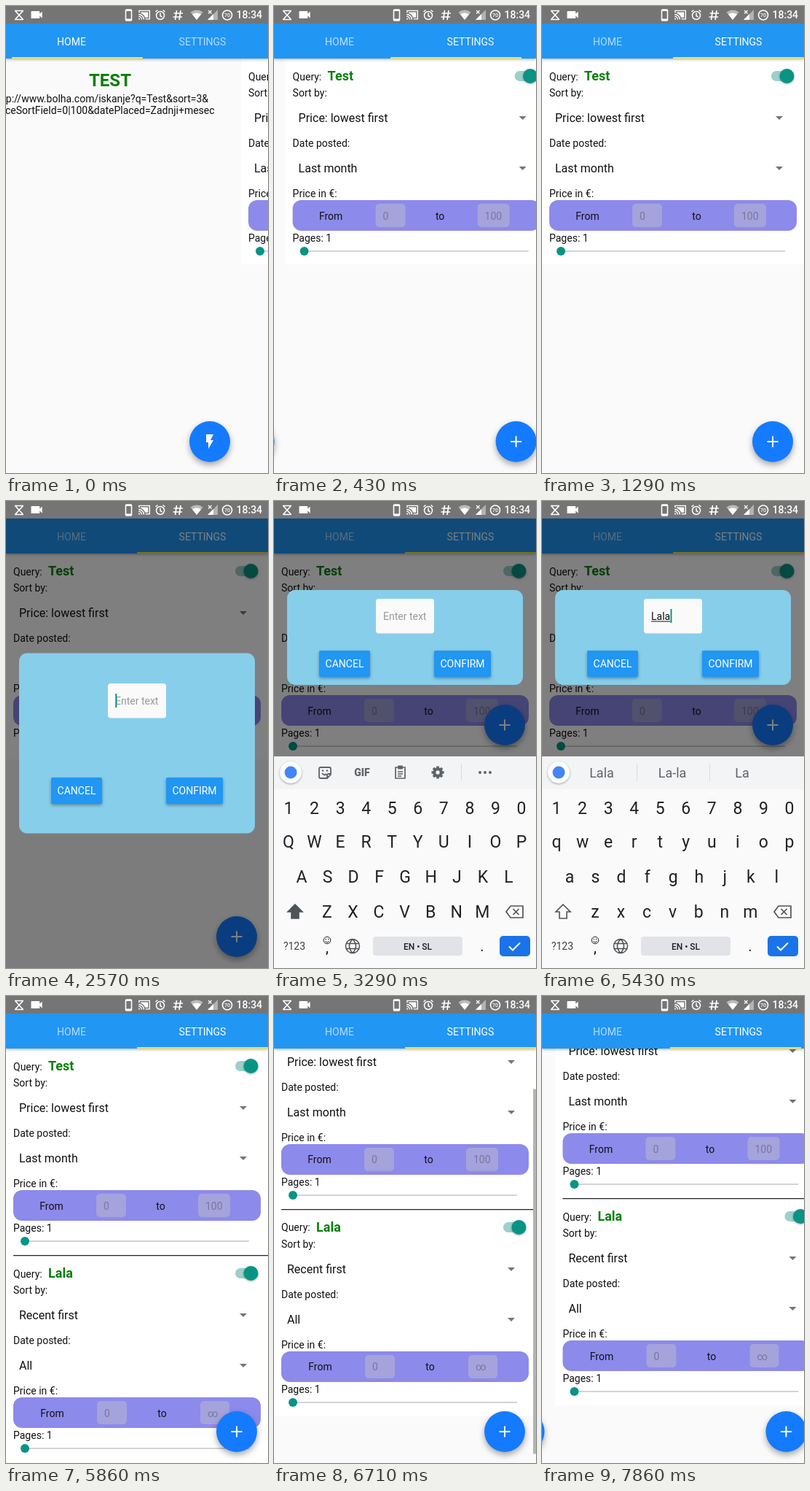
An HTML page with a canvas that plays this animation: 360x640 px, repeating every 8000 ms.

```html
<!DOCTYPE html>
<html lang="en">
<head>
<meta charset="utf-8">
<title>Saved searches</title>
<style>
html, body { margin: 0; width: 100%; height: 100%; overflow: hidden; background: #fafafa; }
canvas { display: block; width: 100vw; height: 100vh; }
</style>
</head>
<body>
<canvas id="stage" width="360" height="640"></canvas>
<script>
const LOOP = 8000, FPS = 7;
const BLUE = '#2196f3', FAB_BLUE = '#147bff', TEAL = '#089485', WHITE = '#fff', INK = '#111', KEY = '#202124';
const ctx = document.getElementById('stage').getContext('2d');

// ---------- motion ----------
function track(t, points) {
  if (t <= points[0][0]) return points[0][1];
  for (let i = 1; i < points.length; i++) {
    const [t0, v0] = points[i - 1], [t1, v1] = points[i];
    if (t < t1) return v0 + (v1 - v0) * (t - t0) / (t1 - t0);
  }
  return points[points.length - 1][1];
}
// Horizontal offset of the settings page; the home page sits 360 to its left.
const pageOffset = t => track(t, [[-100, 360], [0, 323], [150, 190], [300, 70], [430, 15], [570, 0],
  [7560, 0], [7803, 8], [7860, 19]]);
const scrollAt = t => track(t, [[6280, 0], [6430, 18], [6570, 42], [6714, 63], [6860, 72], [7140, 78]]);
const scrollbarAt = t => track(t, [[6280, 0], [6300, 1], [7000, 1], [7290, 0]]);
const keyboardAt = t => track(t, [[2640, 0], [2900, 1], [5640, 1], [5850, 0]]);
const KEY_TIMES = [3800, 4200, 4600, 4980];
const WORD = 'Lala';
const SUGGESTIONS = [[], ['L', 'La', 'Le'], ['La', 'Las', 'Lab'], ['Lal', 'Lala', 'La'], ['Lala', 'La-la', 'La']];

// ---------- drawing helpers ----------
function text(str, x, y, size = 14, color = INK, align = 'left', weight = 400) {
  ctx.font = `${weight} ${size}px Roboto, sans-serif`;
  ctx.textAlign = align;
  ctx.fillStyle = color;
  ctx.fillText(str, x, y);
}
function rect(x, y, w, h, color, radius = 0) {
  ctx.fillStyle = color;
  ctx.beginPath();
  ctx.roundRect(x, y, w, h, radius);
  ctx.fill();
}
function circle(x, y, r, color) {
  ctx.fillStyle = color;
  ctx.beginPath();
  ctx.arc(x, y, r, 0, 7);
  ctx.fill();
}
function at(x, y, scale, draw) {
  ctx.save();
  ctx.translate(x, y);
  ctx.scale(scale, scale);
  draw();
  ctx.restore();
}
function shadowed(blur, dy, draw) {
  ctx.save();
  ctx.shadowColor = 'rgba(0,0,0,.35)';
  ctx.shadowBlur = blur;
  ctx.shadowOffsetY = dy;
  draw();
  ctx.restore();
}
function fill(path, color) {
  ctx.fillStyle = color;
  ctx.fill(new Path2D(path), 'evenodd');
}
function stroke(path, color, width = 1.5) {
  ctx.strokeStyle = color;
  ctx.lineWidth = width;
  ctx.stroke(new Path2D(path));
}
// SVG path of a full circle
const ring = (x, y, r) => `M${x - r} ${y}a${r} ${r} 0 1 0 ${2 * r} 0a${r} ${r} 0 1 0 ${-2 * r} 0`;

// ---------- pages ----------
function fab(x, y, icon) {
  shadowed(8, 4, () => circle(x, y, 28, FAB_BLUE));
  at(x, y, 1, () => icon === 'bolt'
    ? fill('M-5-10V1h3v9L5-2H1l4-8z', WHITE)
    : stroke('M-7.5 0h15M0-7.5v15', WHITE, 2));
}

function picker(value, y) {
  text(value, 18, y, 16);
  fill(`M321 ${y - 8}h10l-5 5z`, '#757575');
}

function queryBlock(q) {
  text('Query:', 10, 101.5);
  text(q.name, 58, 102, 18, '#087f08', 'left', 700);
  rect(315, 89, 28, 14, '#9cd0ca', 7);
  shadowed(3, 1, () => circle(336.5, 96, 10, TEAL));
  text('Sort by:', 10, 124);
  picker(q.sort, 159);
  text('Date posted:', 10, 193);
  picker(q.date, 228);
  text('Price in €:', 10, 262);
  rect(10, 266, 340, 42, '#8c8aeb', 12);
  text('From', 62.5 + q.shift, 292.5, 14, INK, 'center');
  text('to', 212.5 + 2 * q.shift, 292.5, 14, INK, 'center');
  rect(124 + q.shift, 271, 41, 32, '#a5a3dc', 5);
  text('0', 134 + q.shift, 292.5, 14, '#77779c');
  rect(264 + 3 * q.shift, 271, q.maxWidth, 32, '#a5a3dc', 5);
  text(q.max, 274 + 3 * q.shift, 292.5, 14, '#77779c');
  text('Pages: 1', 10, 323);
  rect(26, 335, 308, 2, '#d3d3d3');
  circle(26, 336, 6, TEAL);
}

const QUERIES = [
  { name: 'Test', sort: 'Price: lowest first', date: 'Last month', max: '100', maxWidth: 44, shift: 0 },
  { name: WORD, sort: 'Recent first', date: 'All', max: '∞', maxWidth: 40, shift: 1 },
];

function settingsPage(t, fabY) {
  const count = t >= 5800 ? 2 : 1;
  const scroll = scrollAt(t);
  at(0, -scroll, 1, () => {
    rect(0, 72, 360, count === 2 ? 567 : 282, WHITE);
    for (let i = 0; i < count; i++) at(0, 284 * i, 1, () => queryBlock(QUERIES[i]));
    if (count === 2) rect(10, 355, 350, 1.2, '#222');
  });
  ctx.globalAlpha = scrollbarAt(t);
  rect(356, 72 + scroll * 568 / 646, 4, 500, '#b4b4b4');
  ctx.globalAlpha = 1;
  fab(317, fabY, 'plus');
}

function homePage() {
  text('TEST', 180, 110, 24, '#087f08', 'center', 700);
  text('http://www.bolha.com/iskanje?q=Test&sort=3&', 20, 131.5);
  text('priceSortField=0|100&datePlaced=Zadnji+mesec', 20, 148);
  fab(317, 597, 'bolt');
}

function tabBar(t) {
  const settings = 1 - pageOffset(t - 57) / 360;
  shadowed(4, 1, () => rect(0, 24, 360, 48, BLUE));
  const tint = share => `rgba(255,255,255,${.65 + .35 * share})`;
  text('HOME', 90, 53.5, 14, tint(1 - settings), 'center');
  text('SETTINGS', 270, 53.5, 14, tint(settings), 'center');
  rect(180 * settings, 70, 180, 2, '#f6e344');
}

function statusBar() {
  rect(0, 0, 360, 24, '#757575');
  stroke('M12 6.5h12M12 18.5h12M13 7l10 11M23 7l-10 11', WHITE, 1.6);
  at(32, 2, .84, () => fill('M17 10.5V7q0-1-1-1H4q-1 0-1 1v10q0 1 1 1h12q1 0 1-1v-3.5l4 4v-11z', WHITE));
  stroke('M164.5 6q0-1 1-1h6q1 0 1 1v13q0 1-1 1h-6q-1 0-1-1z', WHITE, 1.6);
  stroke('M164 6h9M164 18.5h9', WHITE, 2);
  at(181.5, 3.5, .72, () => {
    stroke('M2 8V4h20v16h-8M1 11a10 10 0 0 1 10 10M1 15a6 6 0 0 1 6 6', WHITE, 2);
    fill('M1 18a3 3 0 0 1 3 3H1zM5 7h14v10h-5.6A13 13 0 0 0 5 8.6z', WHITE);
  });
  stroke(ring(212, 13, 5.5) + 'M212 9.5v4l2.5 1.5M205.5 8l3-2.5M218.5 8l-3-2.5', WHITE, 1.5);
  stroke('M234.5 6l-2 13M240 6l-2 13M230.5 10h12.5M229.5 15h12.5', WHITE, 1.7);
  fill('M262 19l-8.5-10.5a14 14 0 0 1 17 0z', 'rgba(255,255,255,.5)');
  fill('M262 19l-6-7.4a10 10 0 0 1 12 0z', WHITE);
  fill('M277 19h14V5z', 'rgba(255,255,255,.45)');
  fill('M277 19h8v-8z', WHITE);
  stroke('M278 6l4.5 4.5M282.5 6l-4.5 4.5', WHITE, 1.2);
  stroke(ring(304, 12.5, 6.5), WHITE, 1.6);
  text('70', 304, 15.2, 7, WHITE, 'center', 500);
  text('18:34', 316.5, 17, 14, WHITE, 'left', 500);
}

// ---------- dialog and keyboard ----------
function button(label, x, y, w) {
  shadowed(4, 2, () => rect(x, y, w, 36, BLUE, 2));
  text(label, x + w / 2, y + 23, 14, WHITE, 'center');
}

function dialog(t, compact, typed) {
  const top = compact ? 122 : 208.5;
  const inputY = compact ? 134 : 250;
  const buttonY = compact ? 205 : 379;
  rect(0, 24, 360, 616, 'rgba(0,0,0,.5)');
  rect(18, top, 324, compact ? 130 : 247, '#87ceeb', 11);
  rect(140, inputY, 80, 47.5, '#fafafa', 4);
  const word = WORD.slice(0, typed);
  const baseline = inputY + 29;
  text(word || 'Enter text', 150, baseline, 14, word ? INK : '#999');
  const width = word ? ctx.measureText(word).width : 0;
  if (word) rect(150, baseline + 1.5, width, 1, INK);
  const blinkStart = typed ? KEY_TIMES[typed - 1] : 2560;
  if ((t - blinkStart + 1000) % 1000 < 500) rect(150.3 + width, inputY + 14, 2, 19, TEAL);
  button('CANCEL', 62, buttonY, 70);
  button('CONFIRM', 220, buttonY, 78);
}

function toolbar(typed) {
  const gray = '#5f6368';
  rect(0, 350, 360, 45, '#f3f4f6');
  shadowed(3, 1, () => circle(23, 372, 15, WHITE));
  circle(23, 372, 8.5, '#4285f4');
  if (typed) {
    SUGGESTIONS[typed].forEach((word, i) => text(word, [82, 179, 275][i], 379, 18, gray, 'center'));
    rect(130, 360, 1, 24, '#d8dadd');
    rect(230, 360, 1, 24, '#d8dadd');
    return;
  }
  stroke('M64 365h12q2 0 2 2v8l-5 5h-9q-2 0-2-2v-11q0-2 2-2zM78 374h-3q-2 0-2 2v4M66 373q3 4 6 1', gray, 1.8);
  circle(67, 369.5, 1.2, gray);
  circle(73, 369.5, 1.2, gray);
  text('GIF', 121, 377, 14, gray, 'center', 900);
  stroke('M167 365h13v15h-13zM170 371h7M170 374h7M170 377h5', gray, 1.7);
  rect(170, 362.5, 7, 5, gray, 1);
  stroke(ring(225, 372, 4.7), gray, 4);
  for (let i = 0; i < 8; i++) {
    const a = i * Math.PI / 4, x = Math.cos(a), y = Math.sin(a);
    stroke(`M${225 + 5 * x} ${372 + 5 * y}L${225 + 8.5 * x} ${372 + 8.5 * y}`, gray, 3.6);
  }
  rect(257, 361, 1, 22, '#d8dadd');
  [283, 290, 297].forEach(x => circle(x, 372, 2, gray));
}

function keyRow(keys, x, baseline) {
  [...keys].forEach((key, i) => text(key, x + 35.55 * i, baseline, 23, KEY, 'center'));
}

function keyboard(typed) {
  rect(0, 350, 360, 290, '#fafafb');
  toolbar(typed);
  const letters = row => typed ? row.toLowerCase() : row;
  keyRow('1234567890', 20, 428.5);
  keyRow(letters('QWERTYUIOP'), 20, 474.5);
  keyRow(letters('ASDFGHJKL'), 38, 523);
  keyRow(letters('ZXCVBNM'), 73, 571);

  const shift = 'M29 553l10 10h-5v9h-10v-9h-5z';
  if (!typed) fill(shift, '#505357');
  stroke(shift, '#505357', 1.6);
  stroke('M325 555h17v16h-17l-6-8zM328.5 559l8 8M336.5 559l-8 8', '#505357', 1.7);

  text('?123', 28, 615, 14, '#3c4043', 'center');
  stroke(ring(73, 602, 4.8) + 'M70.3 603.5q2.7 3 5.4 0', KEY, 1);
  circle(71.3, 600.5, .8, KEY);
  circle(74.7, 600.5, .8, KEY);
  text(',', 73, 619, 18, KEY, 'center', 500);
  stroke(ring(108, 610, 9.5) + 'M108 600.5q-9 9.5 0 19q9-9.5 0-19M99.5 606.5h17M99.5 613.5h17', '#505357', 1.5);
  rect(136, 597, 123, 26, '#e2e3e6', 4);
  text('EN • SL', 197.5, 614.5, 12, KEY, 'center', 500);
  text('.', 286, 617, 20, KEY, 'center');
  rect(310, 596, 42, 28, '#1a73e8', 5);
  stroke('M323 610.5l5 5 10-10', WHITE, 2);
}

function draw(t) {
  const offset = pageOffset(t);
  const compact = t >= 2700 && t < 5700;
  const typed = KEY_TIMES.filter(k => t >= k).length;
  const raised = keyboardAt(t);
  rect(0, 0, 360, 640, '#fafafa');
  at(offset - 360, 0, 1, homePage);
  at(offset, 0, 1, () => settingsPage(t, compact ? 307 : 597));
  tabBar(t);
  if (t >= 2400 && t < 5650) dialog(t, compact, typed);
  if (raised > 0) at(0, 290 * (1 - raised), 1, () => keyboard(typed));
  statusBar();
}

function frame() {
  const step = Math.floor((performance.now() % LOOP) * FPS / 1000 + .05);
  draw(step % (LOOP * FPS / 1000) * 1000 / FPS);
  requestAnimationFrame(frame);
}
frame();
</script>
</body>
</html>
```
